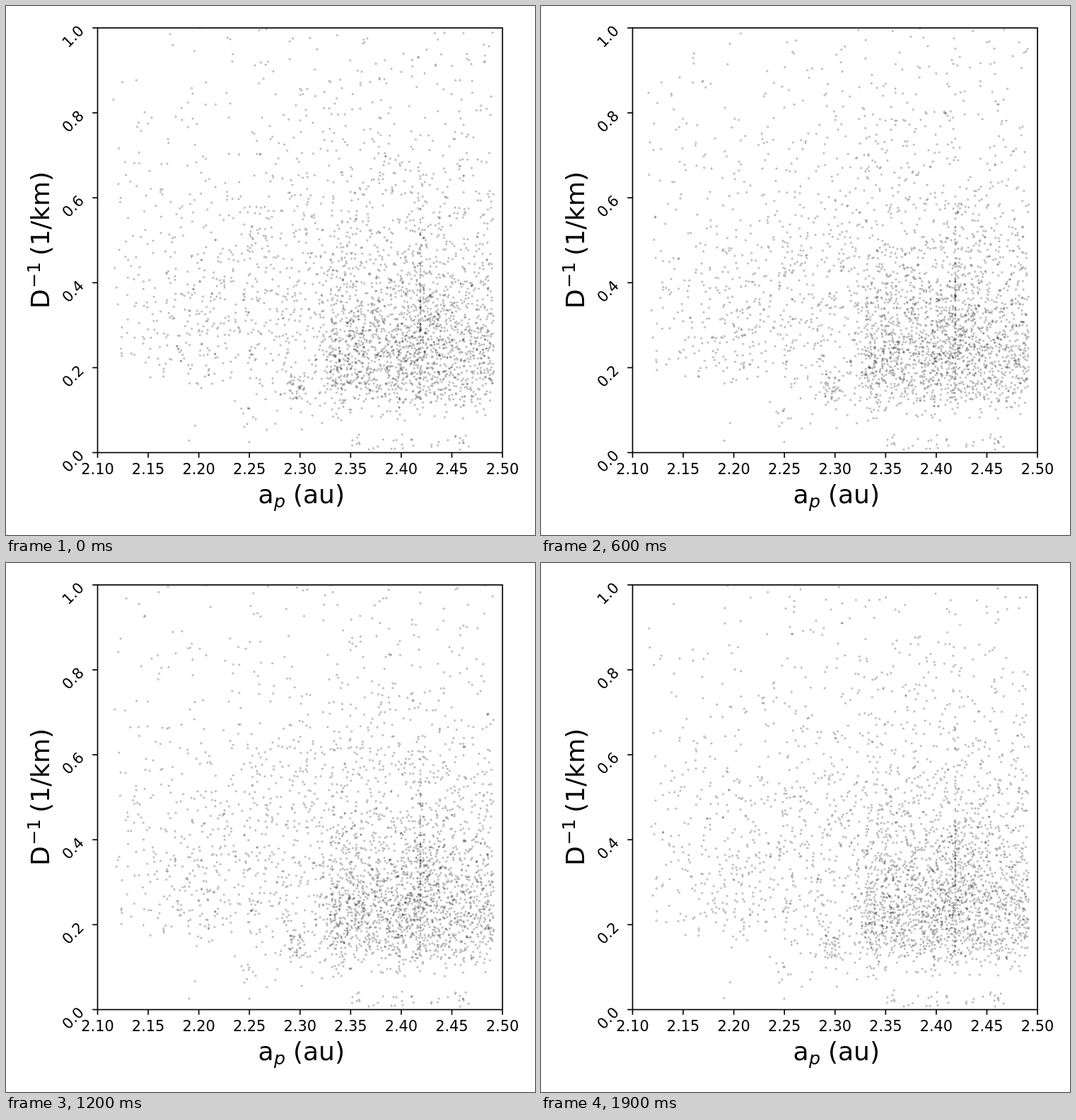
These frames come from a looping animation (748 by 748 pixels, 2000 ms). An HTML page with a canvas:

```html
<!DOCTYPE html>
<html lang="en">
<head>
<meta charset="utf-8">
<title>Inverse diameter against proper semimajor axis</title>
<style>
  html, body { margin: 0; width: 100%; height: 100%; overflow: hidden; background: #fff; }
  canvas { display: block; }
</style>
</head>
<body>
<canvas id="stage" width="748" height="748"></canvas>
<script>
const ctx = document.getElementById('stage').getContext('2d');
const FRAME_MS = 100, FRAMES = 20;
const LEFT = 129.5, RIGHT = 702, TOP = 31, BOTTOM = 631.5;
const FONT = '"DejaVu Sans", sans-serif';
const LABEL = 36, TICK = 20.83;

const toX = a => LEFT + (a - 2.1) / 0.4 * (RIGHT - LEFT);
const toY = d => BOTTOM - d * (BOTTOM - TOP);

function seeded(seed) {
  return () => {
    seed = (seed + 0x6D2B79F5) | 0;
    let t = Math.imul(seed ^ (seed >>> 15), 1 | seed);
    t = (t + Math.imul(t ^ (t >>> 7), 61 | t)) ^ t;
    return ((t ^ (t >>> 14)) >>> 0) / 4294967296;
  };
}
const normal = rnd => Math.sqrt(-2 * Math.log(1 - rnd())) * Math.cos(2 * Math.PI * rnd());

// Fixed positions a with the typical inverse diameter d of each body.
function makeBodies() {
  const rnd = seeded(7), bodies = [];
  const between = (low, high) => low + (high - low) * rnd();
  const around = (mean, spread) => mean + spread * normal(rnd);
  const logNormal = (median, spread) => median * Math.exp(spread * normal(rnd));
  const smallest = a => Math.max(0.08, 0.2 - (a - 2.12) * 0.75);

  function add(count, pickA, pickD, floor = smallest) {
    while (count > 0) {
      const a = pickA(), d = pickD();
      if (a < 2.112 || a > 2.4915 || d < floor(a)) continue;
      bodies.push({ a, d });
      count--;
    }
  }
  const inner = () => 2.115 + 0.22 * rnd() ** 0.75;
  const outer = () => between(2.33, 2.4915);
  const none = () => 0;

  // Inner belt, thin and spread widely in size
  add(820, inner, () => logNormal(0.44, 0.55));
  add(25, () => around(2.2, 0.01), () => logNormal(0.35, 0.4));
  // Outer belt: a dense core below a wide halo
  add(1120, outer, () => logNormal(0.25, 0.36));
  add(260, () => around(2.42, 0.035), () => logNormal(0.28, 0.36));
  add(740, outer, () => logNormal(0.5, 0.44));
  add(60, outer, () => between(0.07, 0.15), none);
  // Small groups
  add(65, () => 2.4188, () => logNormal(0.35, 0.48));
  add(40, () => around(2.297, 0.006), () => around(0.16, 0.023));
  add(70, () => around(2.335, 0.012), () => around(0.22, 0.045));
  add(6, () => around(2.246, 0.003), () => around(0.09, 0.008), none);
  // The largest bodies, close to the bottom axis
  add(36, () => between(2.345, 2.475), () => 0.007 + 0.035 * rnd() ** 1.5, none);
  add(12, () => between(2.17, 2.34), () => between(0.01, 0.11), none);
  return bodies;
}
const bodies = makeBodies();

function drawBodies(frame) {
  const rnd = seeded(1000 + frame * 97);
  ctx.save();
  ctx.beginPath();
  ctx.rect(LEFT, TOP, RIGHT - LEFT, BOTTOM - TOP);
  ctx.clip();
  ctx.strokeStyle = 'rgba(0, 0, 0, 0.4)';
  ctx.lineWidth = 0.8;
  // Smaller bodies are less certain, so they jump further.
  for (const { a, d } of bodies) {
    const spread = 0.02 + 0.22 * Math.min(d, 1);
    ctx.beginPath();
    ctx.arc(toX(a), toY(d * Math.exp(spread * normal(rnd))), 1.05, 0, 2 * Math.PI);
    ctx.stroke();
  }
  ctx.restore();
}

function text(str, x, y, size, { angle = 0, align = 'left', style = '' } = {}) {
  ctx.save();
  ctx.translate(x, y);
  ctx.rotate(angle);
  ctx.font = `${style} ${size}px ${FONT}`;
  ctx.textAlign = align;
  ctx.fillText(str, 0, 0);
  ctx.restore();
}

function line(x1, y1, x2, y2) {
  ctx.beginPath();
  ctx.moveTo(x1, y1);
  ctx.lineTo(x2, y2);
  ctx.stroke();
}

function drawAxes() {
  ctx.fillStyle = ctx.strokeStyle = '#000';
  ctx.lineWidth = 1.67;
  ctx.strokeRect(LEFT, TOP, RIGHT - LEFT, BOTTOM - TOP);
  for (let i = 0; i <= 8; i++) {
    const a = 2.1 + i * 0.05, x = toX(a);
    line(x, BOTTOM, x, BOTTOM + 7.3);
    text(a.toFixed(2), x, 662, TICK, { align: 'center' });
  }
  for (let i = 0; i <= 5; i++) {
    const y = toY(i / 5);
    line(LEFT - 7.3, y, LEFT, y);
    text((i / 5).toFixed(1), 99.6, y + 17.2, TICK, { angle: -Math.PI / 4, align: 'center' });
  }
  text('a', 356.5, 703, LABEL);
  text('p', 379, 708.5, LABEL * 0.7, { style: 'italic' });
  text('(au)', 406, 703, LABEL);
  const up = { angle: -Math.PI / 2 };
  text('D', 61, 428, LABEL, up);
  text('−1', 47.5, 399, LABEL * 0.7, up);
  text('(1/km)', 61, 353, LABEL, up);
}

let shown = -1;
function render() {
  const frame = Math.floor(performance.now() / FRAME_MS) % FRAMES;
  if (frame !== shown) {
    shown = frame;
    ctx.fillStyle = '#fff';
    ctx.fillRect(0, 0, 748, 748);
    drawBodies(frame);
    drawAxes();
  }
  requestAnimationFrame(render);
}
render();
</script>
</body>
</html>
```
